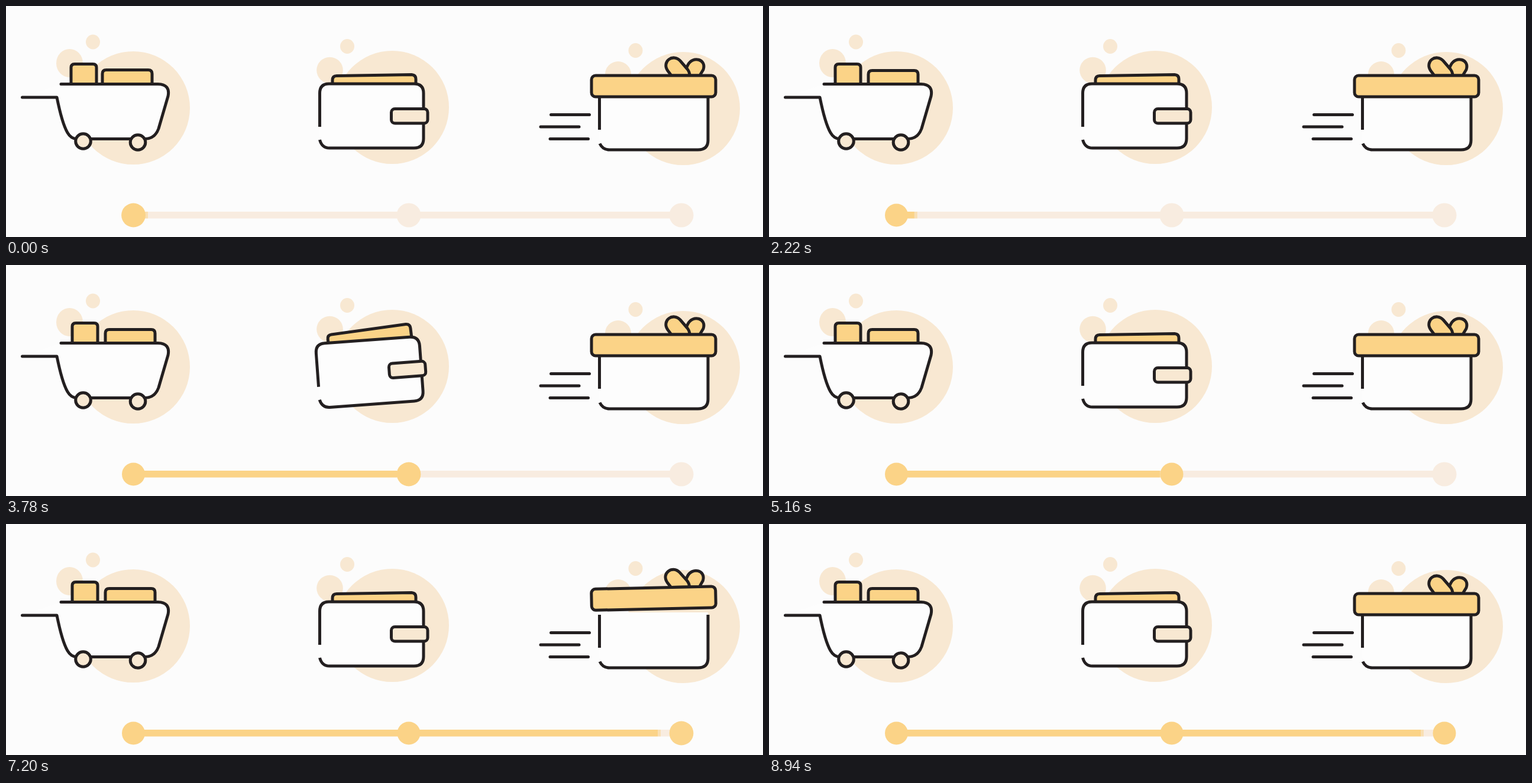
An HTML page for the animation above (9900 ms loop, 1280x392 px).

```html
<!DOCTYPE html>
<html lang="en">
<head>
<meta charset="utf-8">
<title>Order progress</title>
<style>
  html, body { margin: 0; height: 100%; overflow: hidden; background: #fcfcfc; }
  svg { display: block; width: 1280px; height: 392px; }
  .bubble { fill: #f8e8d2; }
  .track { fill: #f8ece0; }
  .gold { fill: #fbd387; }
  .ink { stroke: #231f20; stroke-width: 5; stroke-linejoin: round; }
  .paper { fill: #fdfdfd; }
  .line { fill: none; }
  .round { stroke-linecap: round; }
</style>
</head>
<body>
<svg viewBox="0 0 1280 392">
  <g class="bubble">
    <circle cx="215" cy="173" r="96"/>
    <ellipse cx="107.5" cy="97" rx="22.5" ry="24"/>
    <ellipse cx="147" cy="61" rx="12" ry="12.5"/>
    <circle cx="653" cy="172" r="96"/>
    <circle cx="547.5" cy="109" r="22.3"/>
    <ellipse cx="577" cy="68.5" rx="12" ry="12.5"/>
    <circle cx="1145" cy="174" r="96"/>
    <circle cx="1035" cy="116" r="22"/>
    <ellipse cx="1064.5" cy="75.5" rx="12" ry="12.5"/>
  </g>

  <g id="cart">
    <path id="box1" class="gold ink" d="M112 132V104.500Q112 98.500 118 98.500H149Q155 98.500 155 104.500V132"/>
    <path id="box2" class="gold ink" d="M168 132V116Q168 109.500 174.500 109.500H245.500Q252 109.500 252 116V132"/>
    <path class="paper ink round" d="M27.500 155H86C92 185 97 203 104 215Q110 225.500 120 225.500H235Q252 225 258 208L274 153Q278 133 257 132.500H93"/>
    <g class="bubble ink">
      <circle cx="130.500" cy="229.500" r="12.800"/>
      <circle cx="223" cy="231.500" r="12.800"/>
    </g>
  </g>

  <g id="wallet">
    <path id="card" class="gold ink" d="M552 160V126Q552 118.500 559 118.500L686 116.500Q693 117 693 124V160"/>
    <rect class="paper" x="530.500" y="132" width="175.500" height="109" rx="16"/>
    <path class="line ink" d="M530.500 205V148Q530.500 132 546 132H690Q706 132 706 148V225Q706 241 690 241H547Q534 241 530.500 227"/>
    <rect class="bubble ink" x="651.500" y="174.500" width="61.500" height="24.500" rx="6"/>
  </g>

  <path class="paper" d="M1003.500 150V228Q1003.500 244 1019 244H1170Q1187 244 1187 228V150Z"/>
  <path class="line ink" d="M1003.500 154V210M1004 233.500Q1009 244 1020 244H1170Q1187 244 1187 228V154"/>
  <g id="lid" class="gold ink">
    <path d="M1150 118V106L1153 100C1161 84 1185 90 1179 108L1173 118Z"/>
    <path d="M1125 118L1119 110C1108 94 1128 80 1140 93L1152 107Q1156 112 1156 118Z"/>
    <rect x="990" y="118" width="210" height="36" rx="7"/>
  </g>
  <g id="speed" class="ink round">
    <path d="M921.500 184.500H986.500"/>
    <path d="M904 205H969"/>
    <path d="M920 225.500H984.500"/>
  </g>

  <rect class="track" x="215" y="349" width="927" height="11.500"/>
  <g class="gold">
    <rect id="fill" x="215" y="349" height="11.500"/>
    <rect id="tip" y="349" width="5" height="11.500" opacity=".5"/>
  </g>
  <g id="dots">
    <circle cx="215.500" cy="355"/>
    <circle cx="681" cy="355"/>
    <circle cx="1142" cy="355"/>
  </g>
</svg>
<script>
  const LOOP = 9900, SPEED = 0.3;
  const $ = id => document.getElementById(id);
  const span = (t, from, to) => Math.min(1, Math.max(0, (t - from) / (to - from)));
  const bump = (t, from, to) => Math.sin(Math.PI * span(t, from, to)) ** 2;
  const shift = (el, x, y = 0, turn = '') => el.setAttribute('transform', `translate(${x} ${y}) ${turn}`);
  const mix = (a, b, k) => `rgb(${a.map((v, i) => v + (b[i] - v) * k)})`;
  const PALE = [248, 236, 224], GOLD = [251, 211, 135];
  const litAt = [-150, 3600, 7060];

  function draw(t) {
    shift($('cart'), -8 * bump(t, 0, 1020));
    const settle = Math.cos(Math.PI / 2 * span(t, 0, 1920)) ** 2;
    shift($('box1'), -2 * settle - 4 * bump(t, 0, 1920));
    shift($('box2'), -5 * settle, -settle);

    const tilt = bump(t, 3560, 4260);
    $('wallet').setAttribute('transform', `rotate(${-6 * tilt} 553 232)`);
    $('card').setAttribute('transform', `rotate(${-4 * tilt} 552 126)`);

    const hop = bump(t, 7060, 7680);
    shift($('lid'), 0, -23 * hop, `rotate(${-3 * hop} 1095 136)`);
    [...$('speed').children].forEach((line, i) =>
      shift(line, -11 * bump(t, 7690 + 100 * i, 8720 + 110 * i)));

    const first = Math.min(661, 235 + SPEED * Math.max(0, t - 2185));
    const end = first + SPEED * Math.min(1470, Math.max(0, t - 5520 - 100)) * (t > 5620);
    $('fill').setAttribute('width', Math.min(1142, end) - 215);
    $('tip').setAttribute('x', Math.min(1137, end));

    [...$('dots').children].forEach((dot, i) => {
      dot.setAttribute('r', 20.5 - span(t, litAt[i], litAt[i] + 1600));
      dot.setAttribute('fill', mix(PALE, GOLD, span(t, litAt[i], litAt[i] + 150)));
    });
  }

  function tick(now) {
    draw(now % LOOP);
    requestAnimationFrame(tick);
  }
  tick(performance.now());
</script>
</body>
</html>
```
